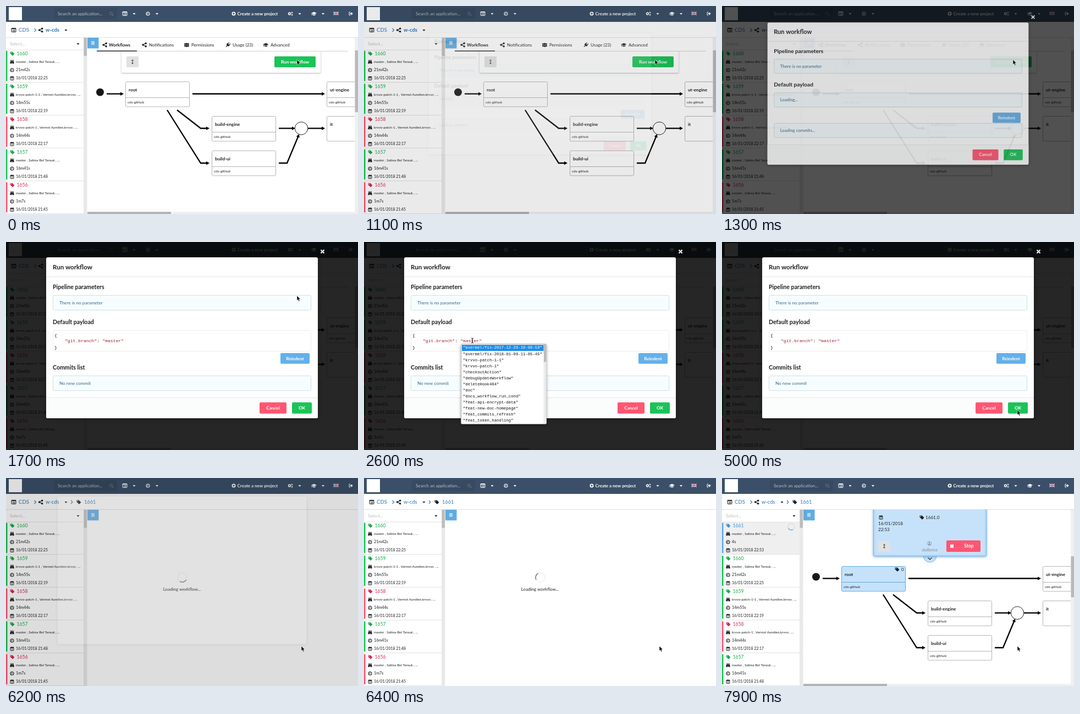
Write an HTML page with a canvas that moves like this. It is 640x380 px and loops after 8 s.

```html
<!DOCTYPE html>
<html lang="en">
<head>
<meta charset="utf-8">
<title>Run workflow</title>
<style>
html, body { margin: 0; width: 100%; height: 100%; overflow: hidden; background: #fff; }
canvas { display: block; width: 640px; height: 380px; }
</style>
</head>
<body>
<canvas id="stage" width="640" height="380"></canvas>
<script>
const W = 640, H = 380, LOOP = 8000;
const GREEN = '#1bc358', RED = '#ff5672', BLUE = '#5fabe3', LINK = '#2f74b5', INK = '#1d1f21', NAVY = '#3b5068';
const OPEN = 1050, LOADED = 1700, POPUP = [2400, 4000], CLOSE = 5930, FADE = 500, LEAVE = 5900, RUN = 7000;
const screen = document.getElementById('stage').getContext('2d');
const sheet = document.createElement('canvas');
sheet.width = W; sheet.height = H;
const layer = sheet.getContext('2d');
let c = screen;

const clamp = v => Math.max(0, Math.min(1, v));

// The CSS "ease" curve
function ease(x) {
  if (x <= 0) return 0;
  if (x >= 1) return 1;
  const bez = (s, a, b) => 3 * (1 - s) * (1 - s) * s * a + 3 * (1 - s) * s * s * b + s * s * s;
  let lo = 0, hi = 1;
  for (let i = 0; i < 24; i++) {
    const m = (lo + hi) / 2;
    if (bez(m, .25, .25) < x) lo = m; else hi = m;
  }
  return bez(lo, .1, 1);
}

// ---- basics: y of a text is its visual centre
function text(s, x, y, size = 8, color = INK, bold = false, align = 'left', face = 'Lato, sans-serif') {
  c.font = (bold ? '700 ' : '400 ') + size + 'px ' + face;
  c.textAlign = align;
  c.fillStyle = color;
  c.fillText(s, x, y + size * .34);
}
const mono = (s, x, y, size, color) =>
  text(s, x, y, size, color, false, 'left', '"Liberation Mono", monospace');

function rect(x, y, w, h, color) { c.fillStyle = color; c.fillRect(x, y, w, h); }

function box(x, y, w, h, r, fill, stroke, lw = 1) {
  c.beginPath();
  c.roundRect(x, y, w, h, r);
  if (fill) { c.fillStyle = fill; c.fill(); }
  if (stroke) { c.strokeStyle = stroke; c.lineWidth = lw; c.stroke(); }
}

function poly(pts, color) {
  c.beginPath();
  pts.forEach(p => c.lineTo(p[0], p[1]));
  c.fillStyle = color;
  c.fill();
}

function line(pts, color, lw = 1) {
  c.beginPath();
  pts.forEach(p => c.lineTo(p[0], p[1]));
  c.strokeStyle = color;
  c.lineWidth = lw;
  c.stroke();
}

function disc(x, y, r, color) {
  c.beginPath();
  c.arc(x, y, r, 0, 7);
  c.fillStyle = color;
  c.fill();
}

function ring(x, y, r, color, lw = 1, a = 0, b = Math.PI * 2) {
  c.beginPath();
  c.arc(x, y, r, a, b);
  c.strokeStyle = color;
  c.lineWidth = lw;
  c.stroke();
}

function shadow(blur, dy, color, draw) {
  c.save();
  c.shadowBlur = blur; c.shadowOffsetY = dy; c.shadowColor = color;
  draw();
  c.restore();
}

function button(label, x, y, w, h, color) {
  box(x, y, w, h, 2, color);
  text(label, x + w / 2, y + h / 2, 8.2, '#fff', true, 'center');
}

// ---- icons, centred on x, y
const icon = {
  caret(x, y, k) { poly([[x - 2.5, y - 1], [x + 2.5, y - 1], [x, y + 2]], k); },
  chevron(x, y, k) { line([[x - 1.5, y - 3], [x + 1.5, y], [x - 1.5, y + 3]], k, 1.1); },
  tag(x, y, k) {
    poly([[x - 4, y - 3.5], [x, y - 3.5], [x + 4, y + .5], [x + .5, y + 4], [x - 4, y - .3]], k);
    disc(x - 2.3, y - 1.9, .8, '#fff');
  },
  list(x, y, k) {
    box(x - 4, y - 3.5, 8, 7, 1, null, k);
    rect(x - 4, y - 4, 8, 2, k);
    for (let i = 0; i < 2; i++) { rect(x - 2.5, y - .7 + i * 2, 1, 1, k); rect(x - 1, y - .7 + i * 2, 3.6, 1, k); }
  },
  clock(x, y, k) {
    ring(x, y, 3, k, 1.1);
    line([[x, y - 2], [x, y + .4], [x - 1.6, y + .4]], k, .9);
  },
  calendar(x, y, k) {
    box(x - 3, y - 2.6, 6, 6, .5, null, k, .9);
    rect(x - 3, y - 3, 6, 1.9, k);
    rect(x - 2, y - 4, 1, 2, k); rect(x + 1, y - 4, 1, 2, k);
    line([[x - 3, y + 1], [x + 3, y + 1]], k, .5);
    line([[x, y - 1], [x, y + 3]], k, .5);
  },
  glasses(x, y, k) {
    rect(x - 2.6, y - 3.4, 2, 2, k); rect(x + .6, y - 3.4, 2, 2, k);
    poly([[x - 2.7, y - 1.6], [x - .4, y - 1.6], [x - .4, y + 3.2], [x - 3.6, y + 3.2], [x - 3.6, y + 1]], k);
    poly([[x + 2.7, y - 1.6], [x + .4, y - 1.6], [x + .4, y + 3.2], [x + 3.6, y + 3.2], [x + 3.6, y + 1]], k);
    rect(x - 1, y - 1, 2, 2, k);
  },
  share(x, y, k) {
    line([[x + 3, y - 3], [x - 2.6, y], [x + 3, y + 3]], k, 1.2);
    disc(x + 2.7, y - 2.8, 1.7, k); disc(x - 2.5, y, 1.7, k); disc(x + 2.7, y + 2.8, 1.7, k);
  },
  users(x, y, k) {
    for (const [dx, dy, r] of [[-3, -1.5, 1.4], [3, -1.5, 1.4], [0, -1.6, 2]]) {
      disc(x + dx, y + dy, r, k);
      box(x + dx - r, y + dy + r + .3, r * 2, 3, 1, k);
    }
  },
  plug(x, y, k) {
    c.save(); c.translate(x, y); c.rotate(.8);
    rect(-2.2, -4.5, 1.2, 3, k); rect(1, -4.5, 1.2, 3, k);
    box(-3, -1.6, 6, 3.6, [0, 0, 3, 3], k);
    rect(-.6, 2, 1.2, 3, k);
    c.restore();
  },
  cap(x, y, k) {
    poly([[x - 5, y - 1], [x, y - 3.3], [x + 5, y - 1], [x, y + 1.3]], k);
    poly([[x - 2.8, y + .8], [x, y + 2], [x + 2.8, y + .8], [x + 2.8, y + 2.6], [x, y + 3.5], [x - 2.8, y + 2.6]], k);
    rect(x - 4.4, y - .8, .8, 3.6, k);
  },
  gears(x, y, k) {
    ring(x - 1.6, y, 1.9, k, 1.5);
    ring(x + 3, y - 2, 1, k, 1);
    ring(x + 3, y + 2.2, 1, k, 1);
  },
  plus(x, y, k, back) {
    disc(x, y, 3.5, k);
    rect(x - 2, y - .6, 4, 1.2, back); rect(x - .6, y - 2, 1.2, 4, back);
  },
  exit(x, y, k) {
    line([[x - 1, y - 2.8], [x - 3, y - 2.8], [x - 3, y + 2.8], [x - 1, y + 2.8]], k, 1);
    poly([[x - 1.4, y - 1], [x + .6, y - 1], [x + .6, y - 3], [x + 3.6, y], [x + .6, y + 3], [x + .6, y + 1], [x - 1.4, y + 1]], k);
  },
  height(x, y, k) {
    rect(x - .5, y - 3, 1, 6, k);
    poly([[x - 2, y - 2], [x, y - 4.3], [x + 2, y - 2]], k);
    poly([[x - 2, y + 2], [x, y + 4.3], [x + 2, y + 2]], k);
  },
  bars(x, y, k) { for (let i = -1; i < 2; i++) rect(x - 3, y + i * 2.3 - .6, 6, 1.2, k); },
  flag(x, y) {
    rect(x - 4.5, y - 3, 9, 6, '#34477f');
    line([[x - 4.5, y - 3], [x + 4.5, y + 3]], '#e8dde2', 1.2);
    line([[x + 4.5, y - 3], [x - 4.5, y + 3]], '#e8dde2', 1.2);
    rect(x - 4.5, y - 1.2, 9, 2.4, '#fff'); rect(x - 1.2, y - 3, 2.4, 6, '#fff');
    rect(x - 4.5, y - .6, 9, 1.2, '#d3384c'); rect(x - .6, y - 3, 1.2, 6, '#d3384c');
  }
};

// ---- page
function navbar() {
  rect(0, 0, W, 29, NAVY);
  rect(5, 2, 24, 24, '#fff');
  box(87, 4, 115, 20, 2, '#374a60');
  text('Search an application...', 94, 14, 8.1, '#b3bfcb');
  ring(191, 13.5, 2.4, '#65788c', 1);
  line([[193, 15.5], [195, 17.5]], '#65788c', 1.2);
  icon.list(216, 14, '#fff'); icon.caret(233, 14, '#fff');
  icon.clock(258, 14, '#fff'); icon.caret(274.5, 14, '#fff');
  icon.plus(414, 14, '#fff', NAVY);
  text('Create a new project', 420.5, 14, 8, '#fff', true);
  icon.gears(517, 14, '#fff'); icon.caret(534, 14, '#fff');
  icon.cap(560, 14, '#fff'); icon.caret(576.5, 14, '#fff');
  icon.flag(600, 13.5);
  icon.exit(627, 14, '#fff');
}

function crumbs(run) {
  icon.list(14, 44, INK);
  text('CDS', 23, 44, 9.6, LINK);
  icon.chevron(53, 44, LINK);
  icon.share(63, 44, INK);
  text('w-cds', 72, 44, 9.4, LINK, !run);
  icon.caret(109, 44, INK);
  if (run) {
    icon.chevron(119.5, 44, LINK);
    icon.tag(132.5, 44, INK);
    text('1661', 142, 44, 9.2, LINK);
  }
  rect(0, 57, W, 1, '#dedede');
}

const SALIMA = 'master , Salima Bel Tarouk , ...';
const runs = [
  ['1661', SALIMA, '4s', '22:53', BLUE],
  ['1660', SALIMA, '21m42s', '22:25', GREEN],
  ['1659', 'krvvo-patch-1-1 , Vermel Aurelien,krvvo , ...', '14m55s', '22:19', GREEN],
  ['1658', 'krvvo-patch-1 , Vermel Aurelien,krvvo , ...', '14m44s', '22:17', RED],
  ['1657', SALIMA, '16m41s', '21:48', GREEN],
  ['1656', SALIMA, '1m7s', '21:45', RED]
];

function sidebar(list, t) {
  text('Select...', 7, 69, 8.3, '#bbb');
  icon.caret(131, 69, INK);
  rect(0, 80, 141, 1, '#e2e2e2');
  list.forEach(([id, who, span, hour, color], i) => {
    const y = 87 + i * 60, live = id === '1661';
    if (live) rect(0, 81, 141, 58, '#efefef');
    rect(0, y - 5, 2.5, 55, color);
    const ink = color === RED ? '#d32a52' : color === GREEN ? '#18ab4a' : '#3f93d2';
    icon.tag(11.5, y, ink);
    text(id, 19.5, y, 8.6, ink);
    icon.glasses(11, y + 15, INK);
    text(who, 18, y + 15, 6.2);
    icon.clock(11, y + 30, INK);
    text(span, 18, y + 30, 7.2);
    icon.calendar(11, y + 45, INK);
    text('16/01/2018 ' + hour, 18, y + 45, 6.95);
    rect(0, y + 52, 141, 1, '#e2e2e2');
    if (live) {
      const a = t / 600 * Math.PI * 2;
      ring(126, 89, 6, '#dcdcdc', 1.4);
      ring(126, 89, 6, '#69b1e6', 1.4, a, a + 1.6);
    }
  });
  rect(141, 58, 6.5, 322, '#e9e9e9');
  rect(141.5, 58, 5.5, 33, '#bdbdbd');
}

function arrow(...pts) {
  const [x, y] = pts[pts.length - 1], [px, py] = pts[pts.length - 2];
  const d = Math.hypot(x - px, y - py), ux = (x - px) / d, uy = (y - py) / d;
  line([...pts.slice(0, -1), [x - ux * 4, y - uy * 4]], '#000', 2.3);
  poly([[x, y], [x - ux * 6 - uy * 3.2, y - uy * 6 + ux * 3.2], [x - ux * 6 + uy * 3.2, y - uy * 6 - ux * 3.2]], '#000');
}

function node(label, x, y, app = true, live = false) {
  const edge = live ? '#62a9df' : '#b4b4b4';
  box(x + .5, y + .5, 116, 45.5, 2, live ? '#c6e2fb' : '#fff', edge);
  text(label, x + 6, y + 15.5, 8.2, INK, true);
  if (app) {
    rect(x, y + 29, 116, 1, edge);
    text('cds-github', x + 4, y + 37.5, 6.5);
  }
}

function graph(dy, live) {
  c.save();
  c.translate(0, dy);
  disc(171, 157.5, 7, '#161616');
  arrow([183, 160.5], [214, 160.5]);
  arrow([339, 160.5], [580, 160.5]);
  arrow([311, 190], [354, 223.5], [370, 223.5]);
  arrow([293, 190], [354, 287], [370, 287]);
  arrow([496, 223.5], [526, 223.5]);
  arrow([496, 287], [511, 287], [533, 234]);
  arrow([549, 223.5], [580, 223.5]);
  node('root', 217, 138, true, live);
  if (live) {
    icon.tag(318.5, 144, INK);
    text('0', 326, 144, 8);
  }
  node('build-engine', 374, 201);
  node('build-ui', 374, 264);
  node('ut-engine', 583, 138);
  node('it', 583, 201, false);
  disc(537, 223.5, 11.7, '#fff');
  ring(537, 223.5, 11.7, '#222', 1);
  c.restore();
}

function bars(y, h) {
  rect(634, 58, 6, 318, '#f0f0f0');
  rect(634.5, y, 5.5, h, '#b9b9b9');
  rect(148, 376, 492, 4, '#f0f0f0');
  rect(147, 376, 153, 4, '#b3b3b3');
}

function editor() {
  shadow(3, 1, 'rgba(0,0,0,.3)', () => box(210, 70, 362, 52, 2, '#fff'));
  box(219, 92, 22, 20, 2, '#e0e1e2');
  icon.height(230, 102, '#444');
  button('Run workflow', 488, 92, 75, 20, GREEN);
  rect(148, 58, 486, 24, '#fff');
  const tabs = [['Workflows', 175, 187, 'share'], ['Notifications', 247, 260, 'share'], ['Permissions', 324, 337, 'users'],
    ['Usage (23)', 399, 412, 'plug'], ['Advanced', 468, 481, 'cap']];
  tabs.forEach(([label, ix, tx, kind], i) => {
    icon[kind](ix + 4.5, 71, INK);
    text(label, tx, 71, 8, INK, i === 0);
  });
  rect(165, 82, 457, 1, '#d0d0d0');
  rect(165, 81.5, 73, 1.5, '#222');
  graph(0, false);
  bars(81, 113);
}

function loader(t) {
  const a = (t - 6200) / 600 * Math.PI * 2 + .55;
  ring(320.5, 181.7, 8.5, '#efefef', 1.5);
  ring(320.5, 181.7, 8.5, '#747474', 1.5, a, a + 1.57);
  text('Loading workflow...', 320, 203.5, 8.05, INK, false, 'center');
}

function runView() {
  const fill = '#c6e2fb', edge = '#7ab8ea';
  disc(378, 142, 12, fill);
  ring(378, 142, 12, edge, 1);
  line([[374.5, 145.5], [378, 149], [381.5, 145.5]], INK, 1.1);
  c.save();
  c.beginPath(); c.rect(148, 58, 486, 90); c.clip();
  shadow(4, 1, 'rgba(60,130,190,.6)', () => box(275.5, 40, 205, 102.5, 2, fill, edge));
  c.restore();
  icon.calendar(289, 72, INK);
  text('16/01/2018', 284, 83, 8.1);
  text('22:53', 284, 94, 8.1);
  icon.tag(363.5, 72, INK);
  text('1661.0', 370, 72, 8.1);
  box(284, 115, 22, 19, 2, '#e0e1e2');
  icon.height(295, 124.5, '#444');
  ring(377, 119.5, 3.8, '#8a98a5', .8);
  disc(377, 118.5, 1.5, '#8a98a5');
  box(374.7, 120.5, 4.6, 2.2, 1, '#8a98a5');
  text('dolbrice', 378, 131, 8.2, '#7e8d9a', false, 'center');
  box(408, 114, 62, 21, 2, RED);
  rect(415, 121.5, 6, 6, '#fff');
  text('Stop', 449, 124.5, 8.5, '#fff', true, 'center');
  graph(23, true);
  bars(143, 75);
}

function page(t) {
  rect(0, 0, W, H, '#fff');
  if (t < LEAVE) editor();
  else if (t < RUN) loader(t);
  else runView();
  rect(0, 28, W, 30, '#fff');
  navbar();
  crumbs(t >= LEAVE);
  rect(0, 58, 148, 322, '#fff');
  sidebar(t < RUN ? runs.slice(1) : runs, t);
  rect(148, 58, 20.5, 19.5, BLUE);
  icon.bars(158, 67.5, '#fff');
}

// ---- dialog
function info(label, y) {
  box(85.5, y + .5, 469, 27, 2, '#f7fdff', '#cbe0e7');
  text(label, 97, y + 14, 8.2, '#2c6690');
}

function dialog(ready, closing) {
  const cut = ready ? 0 : 24;
  if (!ready) c.translate(0, -3);
  shadow(6, 1, 'rgba(0,0,0,.4)', () => box(73, 28, 494, 294 - cut, 3, '#fff'));
  // the content is dropped before the sheet fades away
  if (closing) return;
  line([[572.5, 14.5], [578.5, 20.5]], '#fff', 2);
  line([[578.5, 14.5], [572.5, 20.5]], '#fff', 2);
  text('Run workflow', 85, 46, 11.5, INK, true);
  rect(73, 63, 494, 1, '#e6e6e6');
  text('Pipeline parameters', 85, 82.5, 10.6, INK, true);
  info('There is no parameter', 97);
  text('Default payload', 85, 146, 10.6, INK, true);
  if (ready) {
    box(85.5, 161.5, 469, 38, 1, '#fff', '#ececec');
    mono('{', 88, 170, 8.1, '#111');
    mono('"git.branch"', 107, 180.5, 8.1, '#a11b28');
    mono(':', 165.4, 180.5, 8.1, '#111');
    mono('"master"', 175.2, 180.5, 8.1, '#a11b28');
    mono('}', 88, 192, 8.1, '#111');
    button('Reindent', 499, 203, 53, 19.5, '#64b0ea');
    text('Commits list', 85, 229.5, 10.6, INK, true);
    info('No new commit', 244);
  } else {
    info('Loading...', 161);
    button('Reindent', 499, 199, 53, 19.5, '#64b0ea');
    info('Loading commits...', 219);
  }
  box(73, 285 - cut, 494, 37, [0, 0, 3, 3], '#fbfcfc');
  rect(73, 284 - cut, 494, 1, '#e6e6e6');
  button('Cancel', 461, 293 - cut, 49, 20.5, RED);
  button('OK', 520, 293 - cut, 36, 20.5, GREEN);
}

const branches = ['avermel/fix-2017-12-29-10-00-59', 'avermel/fix-2018-01-09-11-05-45', 'krvvo-patch-1-1', 'krvvo-patch-1',
  'checkoutAction', 'debugUpdateWorkflow', 'deleteHook404', 'doc', 'docs_workflow_run_cond', 'feat-api-encrypt-data',
  'feat-new-doc-homepage', 'feat_commits_refresh', 'feat_token_handling'];

function popup() {
  shadow(5, 2, 'rgba(0,0,0,.3)', () => box(176.5, 186.5, 155, 146, 2, '#fff', '#b8b8b8'));
  rect(178, 188, 149, 11, '#1a8cec');
  branches.forEach((b, i) => mono('"' + b + '"', 180, 193 + i * 11.03, 7.27, i ? '#111' : '#fff'));
  rect(326.5, 187, 5, 145, '#ececec');
  rect(327, 187, 4.5, 32, '#bcbcbc');
}

function overlay(t) {
  const closing = t >= CLOSE;
  const p = closing ? 1 - ease((t - CLOSE) / FADE) : ease((t - OPEN) / FADE);
  if (p <= 0) return;
  rect(0, 0, W, H, `rgba(0,0,0,${.85 * p})`);
  const scale = closing ? .9 + .1 * p : .8 + .2 * p;
  const oy = closing ? 100 : 162;
  c = layer;
  c.clearRect(0, 0, W, H);
  c.save();
  c.translate(320, oy); c.scale(scale, scale); c.translate(-320, -oy);
  dialog(t >= LOADED, closing);
  if (t >= POPUP[0] && t < POPUP[1]) popup();
  c.restore();
  c = screen;
  c.globalAlpha = p;
  c.drawImage(sheet, 0, 0);
  c.globalAlpha = 1;
}

// ---- pointer
const stops = [[0, 529, 98], [1700, 529, 98], [2300, 197, 180], [4000, 197, 180], [4700, 537, 307], [LOOP, 537, 307]];

function pointer(t) {
  const i = stops.findIndex(s => s[0] > t);
  const [t0, x0, y0] = stops[i - 1], [t1, x1, y1] = stops[i];
  const u = clamp((t - t0) / (t1 - t0)), k = u * u * (3 - 2 * u);
  const x = x0 + (x1 - x0) * k, y = y0 + (y1 - y0) * k;
  const inCode = t > LOADED && t < CLOSE && x > 86 && x < 555 && y > 161 && y < 200;
  if (inCode) {
    line([[x - 2, y - 4.5], [x, y - 3.5], [x + 2, y - 4.5]], '#111', 1);
    line([[x, y - 4], [x, y + 4]], '#111', 1.1);
    line([[x - 2, y + 4.5], [x, y + 3.5], [x + 2, y + 4.5]], '#111', 1);
    return;
  }
  const shape = [[0, 0], [0, 9], [2, 7.2], [3.4, 10.4], [5, 9.7], [3.6, 6.6], [6.3, 6.4]].map(q => [x + q[0], y + q[1]]);
  poly(shape, '#000');
  line([...shape, shape[0]], '#fff', .6);
}

function frame(now) {
  const t = now % LOOP;
  page(t);
  overlay(t);
  pointer(t);
  requestAnimationFrame(frame);
}
requestAnimationFrame(frame);
</script>
</body>
</html>
```
